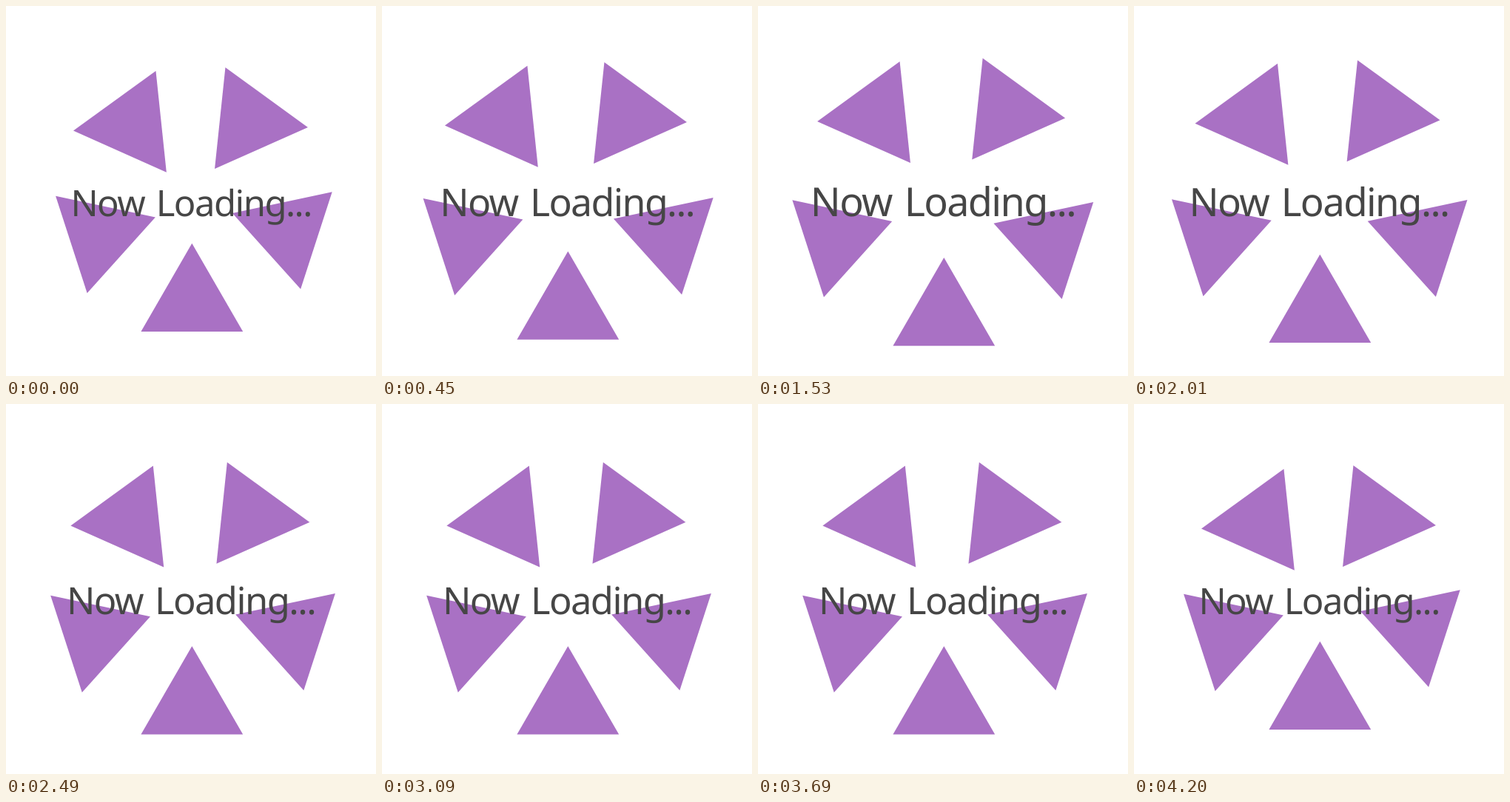
An HTML page that plays this animation: 500 by 500 pixels, repeating every 4.5 s.

```html
<!DOCTYPE html>
<html lang="en">
<head>
<meta charset="utf-8">
<title>Now Loading</title>
<style>
  html, body { margin: 0; width: 100%; height: 100%; overflow: hidden; background: #fff; }
  svg { display: block; width: 100%; height: 100%; }
  text {
    font-family: "Noto Sans", "Open Sans", sans-serif;
    letter-spacing: -0.031em;
    word-spacing: 0.085em;
    text-rendering: geometricPrecision;
  }
</style>
</head>
<body>
<svg viewBox="0 0 500 500">
  <g id="blades" fill="#a971c4"></g>
  <text id="label" y="283.8" fill="#464646">Now Loading...</text>
</svg>
<script>
  const LOOP = 4500, PULSES_END = 4200, PERIOD = 600, STEP = 30;
  const RADIUS = 79.55;

  // Centre, direction of the tip in degrees, and outward travel of each triangle.
  const blades = [
    { x: 251.3, y: 400.3, turn: 0,   dx: 0,     dy: 21.3 },
    { x: 126.2, y: 310.1, turn: 72,  dx: -23,   dy: 6.1 },
    { x: 170.1, y: 160.3, turn: 144, dx: -12.1, dy: -14 },
    { x: 328.8, y: 155.7, turn: 216, dx: 8,     dy: -14 },
    { x: 381.6, y: 304.6, turn: 288, dx: 13.9,  dy: 15.2 },
  ];

  const group = document.getElementById("blades");
  const label = document.getElementById("label");
  const corners = [0, 120, 240].map(degrees => {
    const angle = degrees * Math.PI / 180;
    return `${RADIUS * Math.sin(angle)},${-RADIUS * Math.cos(angle)}`;
  }).join(" ");

  for (const blade of blades) {
    blade.node = document.createElementNS("http://www.w3.org/2000/svg", "polygon");
    blade.node.setAttribute("points", corners);
    group.appendChild(blade.node);
  }

  const mix = (from, to, amount) => from + (to - from) * amount;

  function spreadAt(time) {
    if (time >= PULSES_END) return 0;
    const phase = Math.floor(time / STEP) * STEP % PERIOD / PERIOD;
    return 1 - Math.abs(1 - 2 * phase);
  }

  function draw(time) {
    const spread = spreadAt(time);
    for (const { node, x, y, turn, dx, dy } of blades) {
      node.setAttribute("transform",
        `translate(${x + dx * spread} ${y + dy * spread}) rotate(${turn})`);
    }
    label.setAttribute("x", mix(87.4, 69, spread));
    label.setAttribute("font-size", mix(49, 54.5, spread));
  }

  const start = performance.now();
  function tick() {
    draw((performance.now() - start) % LOOP);
    requestAnimationFrame(tick);
  }
  tick();
</script>
</body>
</html>
```
